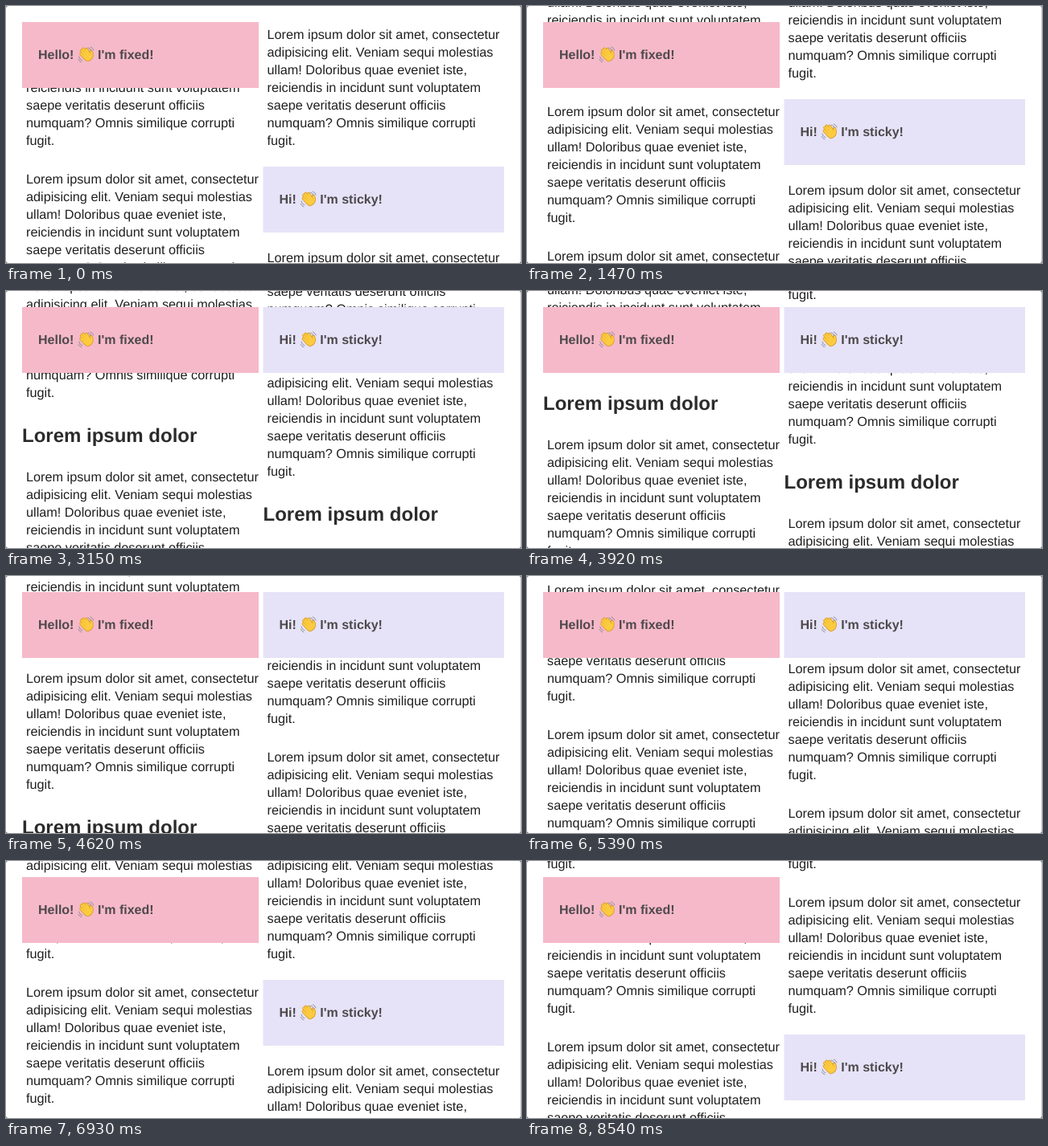
Write an HTML page that moves like this. It is 640 px wide and 320 px high and loops after 8.68 s.

```html
<!DOCTYPE html>
<html lang="en">
<head>
<meta charset="utf-8">
<title>Fixed and sticky</title>
<style>
  html, body { margin: 0; width: 100%; height: 100%; overflow: hidden; background: #fff; }
  svg { display: block; }
  text { font-family: Arial, "Liberation Sans", Helvetica, sans-serif; text-rendering: geometricPrecision; }
  .body { font-size: 16.25px; fill: #202020; }
  .head { font-size: 24px; font-weight: bold; fill: #2b2b2b; }
  .label { font-size: 16px; font-weight: bold; fill: #4d494c; }
</style>
</head>
<body>
<svg width="640" height="320" viewBox="0 0 640 320">
  <defs>
    <g id="wave" fill="none" stroke-linecap="round">
      <g transform="rotate(-36)">
        <g stroke="#d79a2b" stroke-width="4">
          <path id="hand" d="M-3.6 3L-4.4-4.6M-1.2 2L-1.7-7.4M1.3 2L1.2-7.6M3.6 3L4-5.2M3 6.5Q6.6 4.5 7.2 .4"/>
          <rect x="-4" y="1" width="8" height="7" rx="3" fill="#fac536" stroke-width="2"/>
        </g>
        <use href="#hand" stroke="#fccb3f" stroke-width="2.5"/>
        <rect x="-4.3" y="1" width="8.6" height="7" rx="3" fill="#fccb3f"/>
      </g>
      <path stroke="#8d9199" stroke-width="1" d="M2.4-8.6Q5.6-7.6 6.4-4.6M5.4-9.6Q8.4-8.4 9.2-5.6M-9 2.6Q-8.4 6-5 7.4M-9.6 6Q-8.6 8.6-6 9.4"/>
    </g>
  </defs>
  <rect width="640" height="320" fill="#fff"/>
  <g id="page"></g>
  <g id="fixed" transform="translate(20 20)">
    <rect width="294" height="82" fill="#f6b9c9"/>
    <text class="label" x="20" y="46">Hello!</text>
    <use href="#wave" x="79.6" y="40.5"/>
    <text class="label" x="94" y="46">I'm fixed!</text>
  </g>
  <g id="sticky">
    <rect width="299.5" height="82" fill="#e6e3f8"/>
    <text class="label" x="20" y="46">Hi!</text>
    <use href="#wave" x="56.4" y="40.5"/>
    <text class="label" x="70.8" y="46">I'm sticky!</text>
  </g>
  <path d="M639.5 0V320" stroke="#d4d4d4"/>
  <path fill="#6a6a6a" d="M0 0H3Q0 0 0 3ZM640 0V3Q640 0 637 0ZM0 320V317Q0 320 3 320ZM640 320H637Q640 320 640 317Z"/>
</svg>
<script>
const LOOP = 8680, TICK = 70, LINE = 22;
const TOP = 20, STICKY_X = 319.5, STICKY_Y = 200;

const lines = [
  "Lorem ipsum dolor sit amet, consectetur",
  "adipisicing elit. Veniam sequi molestias",
  "ullam! Doloribus quae eveniet iste,",
  "reiciendis in incidunt sunt voluptatem",
  "saepe veritatis deserunt officiis",
  "numquam? Omnis similique corrupti",
  "fugit."
];

// Paragraph tops and heading baselines, at zero scroll
const columns = [
  { x: 20, paras: [-155, 25, 205, 385, 622, 802], heading: 589 },
  { x: STICKY_X, paras: [-155, 25, 303, 483, 720], heading: 687 }
];

// Flicks of the scroll: start ms, end ms, final offset, deceleration
const flicks = [
  [770, 1470, 84, 1.7],
  [1540, 2660, 284.8, 1.7],
  [2730, 3640, 446, 1.7],
  [3850, 5110, 247, 1.7],
  [5180, 5950, 126, 1.8],
  [6510, 7630, -16, 1.54]
];

const page = document.getElementById("page");
const sticky = document.getElementById("sticky");

function addText(cls, x, y, content) {
  const el = document.createElementNS("http://www.w3.org/2000/svg", "text");
  el.setAttribute("class", cls);
  el.setAttribute("x", x);
  el.setAttribute("y", y);
  el.textContent = content;
  page.appendChild(el);
}

for (const { x, paras, heading } of columns) {
  for (const top of paras) {
    lines.forEach((line, i) => addText("body", x + 5, top + 16 + i * LINE, line));
  }
  addText("head", x, heading, "Lorem ipsum dolor");
}

function ease(p, power) {
  const q = 1 - (1 - p) ** power;
  return q * q * (3 - 2 * q);
}

function scrollAt(t) {
  let pos = 0;
  for (const [start, end, target, power] of flicks) {
    if (t <= start) break;
    const p = Math.min(1, (t - start) / (end - start));
    pos += (target - pos) * ease(p, power);
  }
  return Math.round(pos);
}

function draw(ms) {
  const t = Math.floor((ms % LOOP) / TICK) * TICK;
  const scroll = scrollAt(t);
  page.setAttribute("transform", `translate(0 ${-scroll})`);
  sticky.setAttribute("transform", `translate(${STICKY_X} ${Math.max(TOP, STICKY_Y - scroll)})`);
}

const begin = performance.now();
function frame() {
  draw(performance.now() - begin);
  requestAnimationFrame(frame);
}
frame();
</script>
</body>
</html>
```
